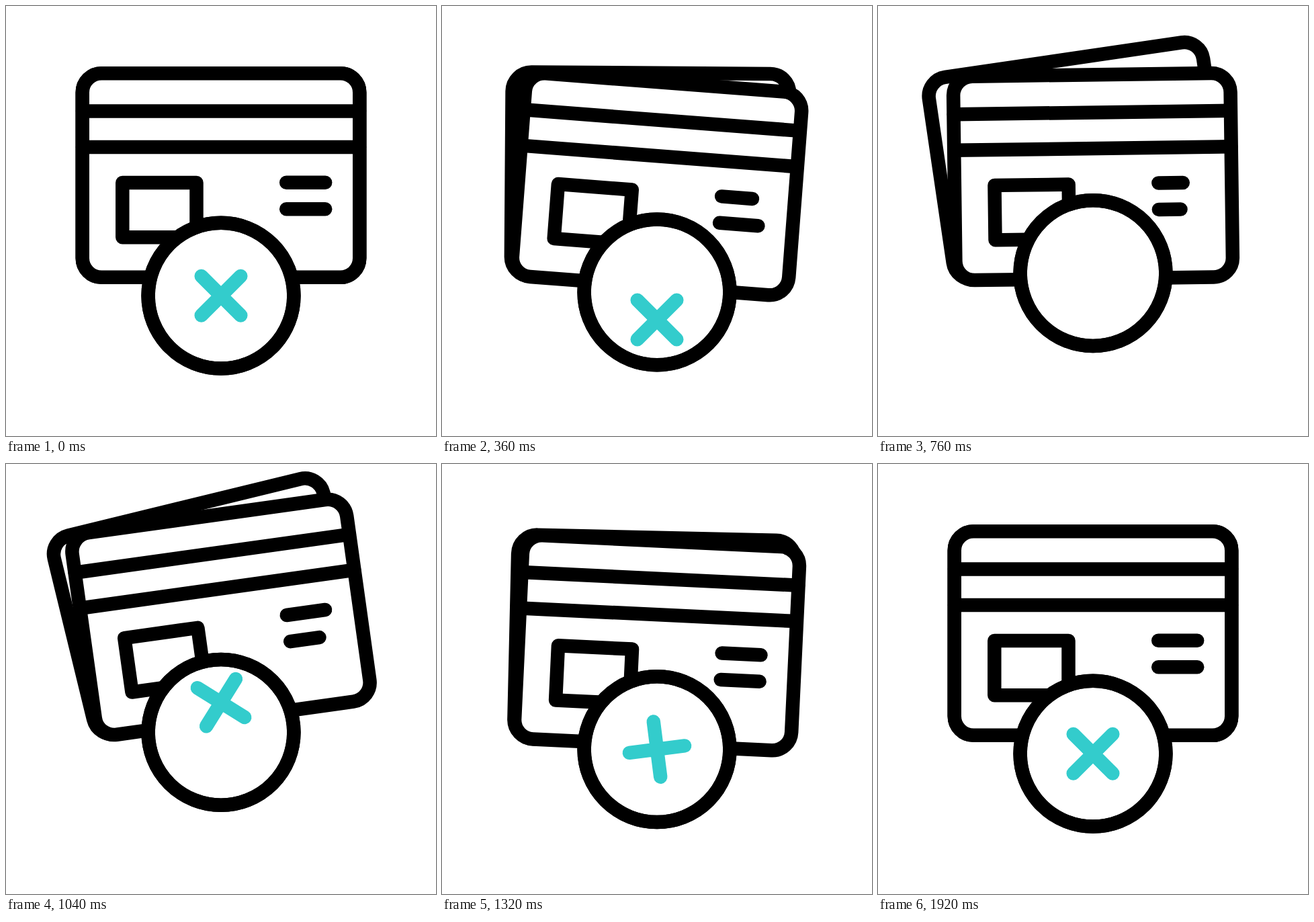
An HTML page that plays this animation: 640 by 640 pixels, repeating every 2.08 s.

```html
<!DOCTYPE html>
<html lang="en">
<head>
<meta charset="utf-8">
<title>Card declined</title>
<style>
  html, body { margin: 0; width: 100%; height: 100%; overflow: hidden; background: #fff; }
  svg { display: block; width: 100vw; height: 100vh; }

  .ink { fill: none; stroke: #000; stroke-width: 20.5; stroke-linecap: round; stroke-linejoin: round; }
  .paper { fill: #fff; }
  .cross { stroke: #3cc; }

  .cards, .back, .badge, .drop, .spin, .dash {
    animation: 2080ms cubic-bezier(.3333, 0, .6667, 1) infinite;
  }
  .cards { transform-origin: 320px 252px; animation-name: bob, sway; }
  .back { transform-origin: 128px 404px; animation-name: fan; }
  .badge { animation-name: lift; }
  .drop { animation-name: drop; }
  .spin { transform-origin: 320px 431.2px; animation-name: spin; }
  .dash { stroke-dasharray: 58 100; animation-name: shrink; }
  .late { animation-delay: 200ms; }

  @keyframes bob {
    0%, 5.77% { translate: 0 0; }
    22.36%, 27.88% { translate: 0 17px; }
    49.33% { translate: 0 -24.5px; }
    62.02% { translate: 0 14.5px; }
    81.73%, 100% { translate: 0 0; }
  }
  @keyframes sway {
    0%, 5.77% { rotate: 0deg; }
    23.56%, 24.76% { rotate: 6.1deg; }
    48.8%, 50.24% { rotate: -7.95deg; }
    64.9% { rotate: 3deg; }
    81.73%, 100% { rotate: 0deg; }
  }
  @keyframes fan {
    0%, 5.77% { rotate: 0deg; }
    28.17%, 39.42% { rotate: -7.6deg; }
    72.6%, 100% { rotate: 0deg; }
  }
  @keyframes lift {
    0%, 9.9% { translate: 0 0; }
    40.19%, 45.43% { translate: 0 -35px; }
    70.43%, 100% { translate: 0 0; }
  }
  /* Leaves through the bottom, comes back in from the top */
  @keyframes drop {
    0%, 5.77% { translate: 0 0; }
    39.42% { translate: 0 150px; }
    39.43% { translate: 0 -150px; }
    56.01%, 100% { translate: 0 0; }
  }
  @keyframes spin {
    0%, 37.29% { rotate: 0deg; }
    37.3% { rotate: -45deg; }
    69.04% { rotate: 45deg; }
    91.83%, 100% { rotate: 0deg; }
  }
  @keyframes shrink {
    0%, 5.77% { stroke-dashoffset: 0; }
    30.77% { stroke-dashoffset: 27px; }
    50.96%, 100% { stroke-dashoffset: 0; }
  }
</style>
</head>
<body>
<svg viewBox="0 0 640 640">
  <defs>
    <rect id="card" x="113.75" y="100.25" width="412.5" height="303.5" rx="28.5"/>
    <clipPath id="window"><circle cx="320" cy="431.2" r="100"/></clipPath>
  </defs>

  <g class="cards ink">
    <use class="back paper" href="#card"/>
    <use class="paper" href="#card"/>
    <path d="M114 156.5H526M114 210H526"/>
    <path d="M173.3 263H283.5V344.3H173.3Z"/>
    <path class="dash" d="M417.2 262.7h58"/>
    <path class="dash late" d="M417.2 302.2h58"/>
  </g>

  <g class="badge ink">
    <circle class="paper" cx="320" cy="431.2" r="108.4"/>
    <g clip-path="url(#window)">
      <g class="drop">
        <path class="spin cross" d="M290.7 401.9l58.6 58.6m0-58.6l-58.6 58.6"/>
      </g>
    </g>
    <circle cx="320" cy="431.2" r="108.4"/>
  </g>
</svg>
</body>
</html>
```
